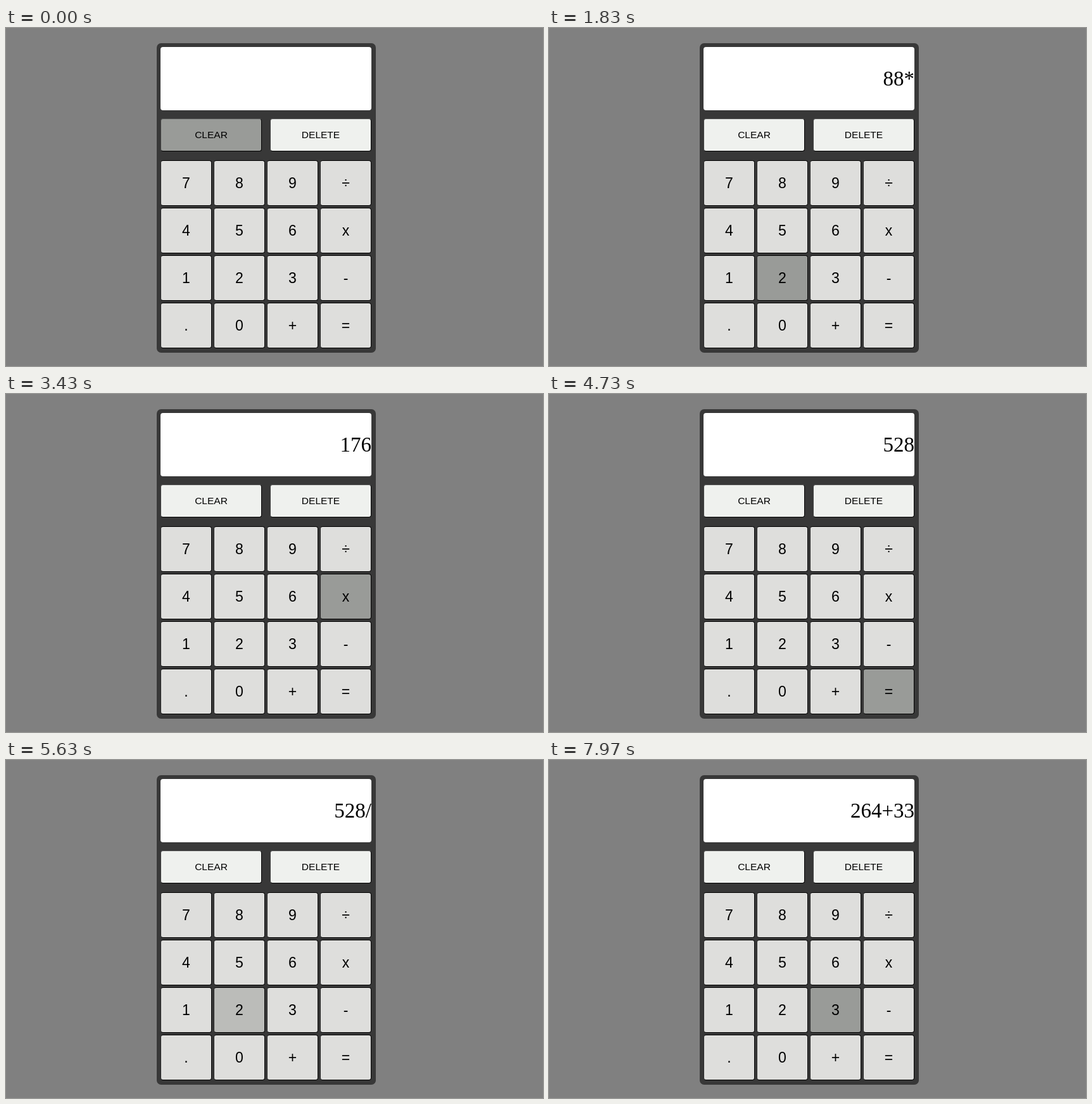
Recreate the animation shown at these times as an HTML page. Size 848 by 534 pixels, loop 8 s.

```html
<!DOCTYPE html>
<html lang="en">
<head>
<meta charset="utf-8">
<title>Calculator</title>
<style>
  html, body { margin: 0; width: 100%; height: 100%; overflow: hidden; background: #808080; }
  div { position: absolute; box-sizing: border-box; }
  #panel { left: 238px; top: 24px; width: 346px; height: 489px; border-radius: 7px; background: #383838; }
  #display {
    left: 244px; top: 30px; width: 333px; height: 100px; border-radius: 4px; background: #fff;
    font: 33px/100px "Liberation Serif", "Times New Roman", serif; text-align: right; white-space: pre;
  }
  .key {
    border: 1px solid #000; border-left-color: #2c2c2c; border-radius: 4px; text-align: center;
    font: 23px/70px "Liberation Sans", Arial, sans-serif; color: #000;
  }
  .wide { font-size: 15.5px; line-height: 50px; border-color: #555 #000 #000 #484848; border-bottom-width: 1.5px; }
</style>
</head>
<body>
<div id="panel"></div>
<div id="display"></div>
<script>
const LOOP = 8000, FADE = 160;
const HOVER = [153, 155, 152], PLAIN = [222, 222, 220], LIGHT = [239, 241, 238];
const display = document.getElementById('display');
const keys = [];

// Pointer visits: key label, arrival and departure in ms.
const visits = [
  ['CLEAR', -500, 130], ['8', 270, 880], ['x', 1120, 1460], ['2', 1620, 2060],
  ['=', 2240, 2760], ['x', 3060, 3700], ['3', 3960, 4330], ['=', 4500, 4880],
  ['÷', 5140, 5420], ['2', 5550, 6000], ['=', 6170, 6500], ['+', 6680, 7120],
  ['3', 7330, 8500]
];

// What the display reads from each time on.
const readings = [
  [0, ''], [470, '8'], [700, '88'], [1330, '88*'], [1930, '88*2'], [2440, '176'],
  [3560, '176*'], [4210, '176*3'], [4660, '528'], [5310, '528/'], [5890, '528/2'],
  [6350, '264'], [6920, '264+'], [7560, '264+3'], [7790, '264+33']
];

function addKey(label, x, y, width, height, color, wide) {
  const el = document.createElement('div');
  el.className = wide ? 'key wide' : 'key';
  el.textContent = label;
  Object.assign(el.style, { left: x + 'px', top: y + 'px', width: width + 'px', height: height + 'px' });
  document.body.append(el);
  keys.push({ el, color, stays: visits.filter(v => v[0] === label) });
}

addKey('CLEAR', 244, 143, 160, 52, LIGHT, true);
addKey('DELETE', 417, 143, 160, 52, LIGHT, true);
[...'789÷456x123-.0+='].forEach((label, i) =>
  addKey(label, 244 + i % 4 * 84, 209 + Math.floor(i / 4) * 75, 81, 72, PLAIN));

const ramp = t => {
  const p = Math.min(1, Math.max(0, t / FADE));
  return p * p * (3 - 2 * p);
};

function draw(now) {
  const t = now % LOOP;
  for (const { el, color, stays } of keys) {
    const level = Math.max(0, ...stays.map(([, from, to]) => ramp(t - from) - ramp(t - to)));
    el.style.backgroundColor = `rgb(${color.map((c, i) => Math.round(c + (HOVER[i] - c) * level))})`;
  }
  const text = readings.findLast(r => r[0] <= t)[1];
  if (display.textContent !== text) display.textContent = text;
}

const start = performance.now();
function tick() {
  draw(performance.now() - start);
  requestAnimationFrame(tick);
}
tick();
</script>
</body>
</html>
```
